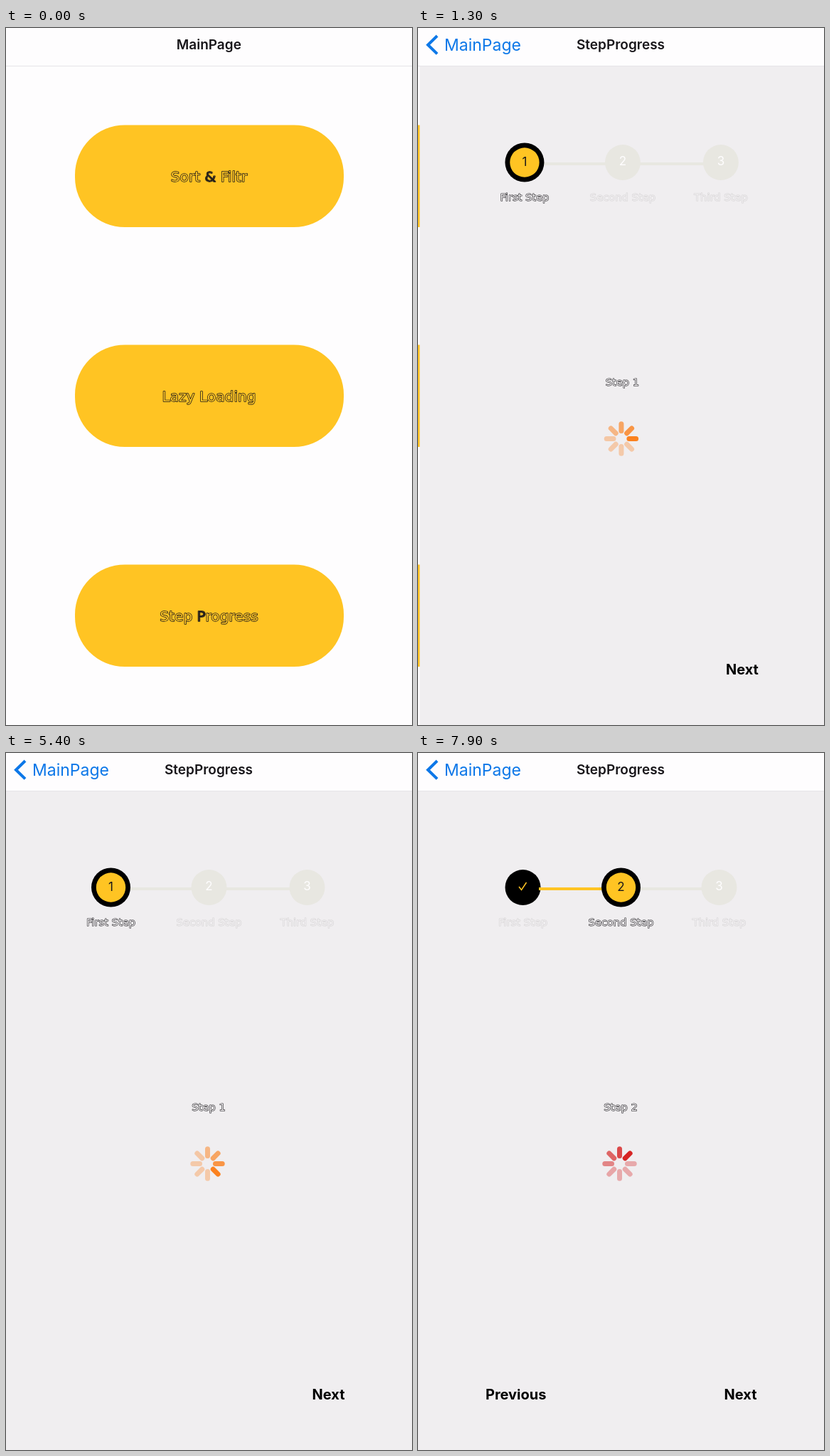
An HTML page with a canvas that plays this animation: 571x980 px, repeating every 8000 ms.

```html
<!DOCTYPE html>
<html lang="en">
<head>
<meta charset="utf-8">
<title>Step progress</title>
<style>
html, body { margin: 0; width: 100%; height: 100%; overflow: hidden; background: #fefdfe; }
canvas { display: block; width: 571px; height: 980px; }
</style>
</head>
<body>
<canvas id="stage" width="571" height="980"></canvas>
<script>
const W = 571, H = 980, LOOP = 8000;
const PUSH = 884, STEP = 5800;
const ctx = document.getElementById('stage').getContext('2d');

const WHITE = [254, 253, 254], GREY = [240, 238, 240], YELLOW = [255, 196, 35];
const BLACK = [0, 0, 0], PALE = [232, 231, 225], INK = [24, 22, 26], FAINT = [211, 209, 210];
const ORANGE = [251, 130, 32], RED = [214, 36, 36];
const TAIL = [1, 0.82, 0.68, 0.52, 0.36, 0.34, 0.34, 0.34];
const UI = 'Inter, Roboto, sans-serif', ENGRAVED = '"DejaVu Sans", sans-serif';

const clamp = v => Math.max(0, Math.min(1, v));
const ramp = (t, start, length) => clamp((t - start) / length);
const ease = v => v < 0.5 ? 2 * v * v : 1 - 2 * (1 - v) * (1 - v);
const mix = (a, b, k) => a.map((v, i) => v + (b[i] - v) * k);
const css = c => `rgb(${c.map(Math.round).join(',')})`;

// Touch feedback: dims to a fifth, then recovers.
const touch = (t, down, up) => 1 - 0.8 * ease(ramp(t, down, 150)) * (1 - ease(ramp(t, up, 250)));

// Critically damped spring for the page push.
function pushLeft(t) {
  if (t <= PUSH) return 1;
  const a = (t - PUSH) * 0.01826;
  return a > 11 ? 0 : (1 + a) * Math.exp(-a);
}

function text(str, x, y, font, color, align = 'center') {
  ctx.font = font;
  ctx.textAlign = align;
  ctx.fillStyle = css(color);
  ctx.fillText(str, x, y);
}

function outlined(str, x, y, size, ink, inside, solid = '') {
  ctx.font = `${size}px ${ENGRAVED}`;
  ctx.textAlign = 'left';
  ctx.lineJoin = 'round';
  ctx.strokeStyle = css(ink);
  ctx.lineWidth = size > 18 ? 1.5 : 1.1;
  const left = x - ctx.measureText(str).width / 2;
  ctx.strokeText(str, left, y);
  ctx.fillStyle = css(inside);
  ctx.fillText(str, left, y);
  if (solid) {
    const at = left + ctx.measureText(str.slice(0, str.indexOf(solid))).width;
    ctx.fillStyle = css(ink);
    ctx.fillText(solid, at, y);
  }
}

function disc(x, y, r, color) {
  ctx.fillStyle = css(color);
  ctx.beginPath();
  ctx.arc(x, y, r, 0, Math.PI * 2);
  ctx.fill();
}

function bar(x1, x2, color) {
  ctx.fillStyle = css(color);
  ctx.fillRect(x1, 189, x2 - x1, 4);
}

function bigButton(label, y, alpha, solid) {
  const face = mix(WHITE, YELLOW, alpha);
  ctx.fillStyle = css(face);
  ctx.beginPath();
  ctx.roundRect(97, y, 378, 143.5, 70);
  ctx.fill();
  outlined(label, 285.5, y + 79, 20.2, mix(WHITE, INK, alpha), face, solid);
}

function mainPage(t) {
  ctx.fillStyle = css(WHITE);
  ctx.fillRect(0, 0, W + 200, H);
  bigButton('Sort & Filtr', 136.5, 1, '&');
  bigButton('Lazy Loading', 445.5, 1);
  bigButton('Step Progress', 754.5, touch(t, 640, 880), 'P');
}

function spinner(x, y, head, color) {
  ctx.lineWidth = 7;
  ctx.lineCap = 'round';
  for (let i = 0; i < 8; i++) {
    const a = (i - 2) * Math.PI / 4, c = Math.cos(a), s = Math.sin(a);
    ctx.strokeStyle = css(mix(GREY, color, TAIL[(head - i + 8) % 8]));
    ctx.beginPath();
    ctx.moveTo(x + c * 11, y + s * 11);
    ctx.lineTo(x + c * 20.7, y + s * 20.7);
    ctx.stroke();
  }
  ctx.lineCap = 'butt';
}

function currentDot(x, label, grow) {
  disc(x, 189, 25 + 2.5 * grow, BLACK);
  disc(x, 189, 20.7, YELLOW);
  text(label, x, 193.5, `17px ${UI}`, INK);
}

function pendingDot(x, label) {
  disc(x, 189, 25, PALE);
  text(label, x, 193, `17px ${UI}`, WHITE);
}

function doneDot(x) {
  disc(x, 189, 25, BLACK);
  ctx.strokeStyle = css(YELLOW);
  ctx.lineWidth = 1.5;
  ctx.beginPath();
  ctx.moveTo(x - 5.5, 188);
  ctx.lineTo(x - 2, 192.5);
  ctx.lineTo(x + 5, 182);
  ctx.stroke();
}

function stepPage(t) {
  const second = t >= STEP, xs = [147.5, 285.5, 423.5];
  ctx.fillStyle = css(GREY);
  ctx.fillRect(0, 0, W, H);

  bar(170, 262, PALE);
  bar(308, 400, PALE);
  if (second) {
    doneDot(xs[0]);
    bar(170, 170 + 92 * ramp(t, STEP, 200), YELLOW);
    currentDot(xs[1], '2', ramp(t, STEP + 200, 100));
  } else {
    currentDot(xs[0], '1', 1);
    pendingDot(xs[1], '2');
  }
  pendingDot(xs[2], '3');

  ['First Step', 'Second Step', 'Third Step'].forEach((label, i) =>
    outlined(label, xs[i], 242.5, 14.7, i === +second ? INK : FAINT, GREY));
  outlined(second ? 'Step 2' : 'Step 1', 285, 503, 14.7, INK, GREY);

  const tick = Math.floor(t / 100);
  spinner(283.5, 577.5, (tick + (second ? 2 : 5)) % 8, second ? RED : ORANGE);

  const bold = `700 20px ${UI}`;
  text('Next', 453.5, 909, bold, mix(GREY, BLACK, touch(t, 5600, STEP)));
  if (second) text('Previous', 137.7, 909, bold, BLACK);
}

function header(shown) {
  ctx.fillStyle = css(WHITE);
  ctx.fillRect(0, 0, W, 53);
  ctx.fillStyle = '#e6e5e8';
  ctx.fillRect(0, 53, W, 1);

  const title = `600 19px ${UI}`, blue = [12, 119, 232];
  ctx.globalAlpha = 1 - shown;
  text('MainPage', 285.3, 30, title, INK);
  ctx.globalAlpha = shown;
  text('StepProgress', 285, 30, title, INK);
  text('MainPage', 37, 32.3, `23px ${UI}`, blue, 'left');
  ctx.strokeStyle = css(blue);
  ctx.lineWidth = 4;
  ctx.lineJoin = 'miter';
  ctx.beginPath();
  ctx.moveTo(27, 11);
  ctx.lineTo(14, 23.7);
  ctx.lineTo(27, 36.4);
  ctx.stroke();
  ctx.globalAlpha = 1;
}

function page(x, paint, t) {
  ctx.save();
  ctx.translate(x, 0);
  paint(t);
  ctx.restore();
}

function draw(t) {
  const rest = pushLeft(t);
  if (rest > 0) page(-0.3 * W * (1 - rest), mainPage, t);
  if (rest < 1) page(W * rest, stepPage, t);
  header(1 - rest);
}

const begin = performance.now();
function frame(now) {
  draw(Math.max(0, now - begin) % LOOP);
  requestAnimationFrame(frame);
}
draw(0);
requestAnimationFrame(frame);
</script>
</body>
</html>
```
